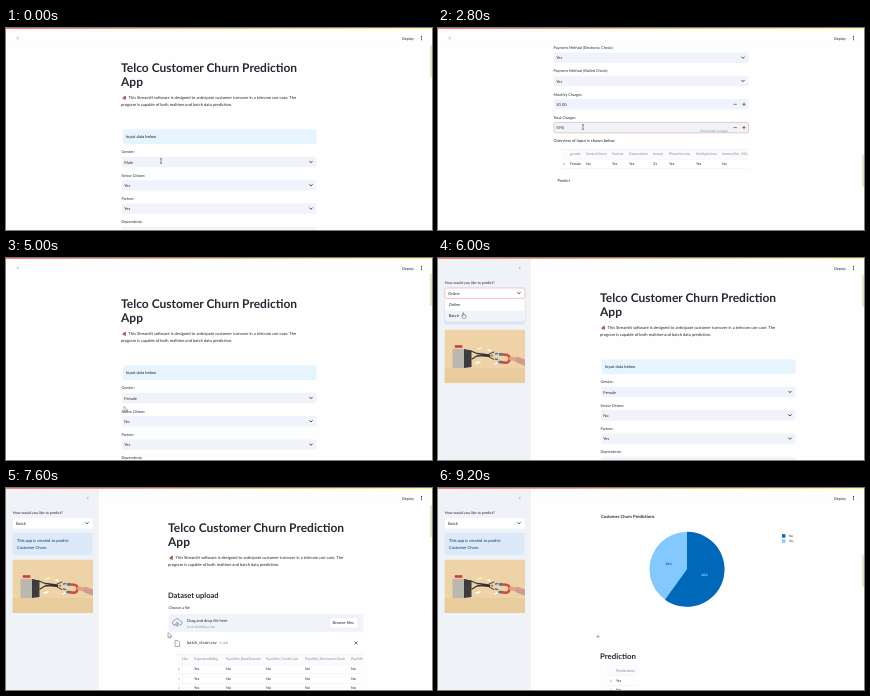
An HTML page that plays this animation: 426x202 px, repeating every 9.27 s.

```html
<!DOCTYPE html>
<html lang="en">
<head>
<meta charset="utf-8">
<title>Telco Customer Churn Prediction App</title>
<style>
  html, body { margin: 0; width: 100%; height: 100%; overflow: hidden; background: #fefefe; }
  svg { display: block; width: 100%; height: 100%; }
  text { font-family: Lato, "Open Sans", sans-serif; text-rendering: geometricPrecision; white-space: pre; }
</style>
</head>
<body>
<svg id="stage" viewBox="0 0 426 202">
  <defs>
    <linearGradient id="stripe">
      <stop offset="0" stop-color="#ff7a6b"/>
      <stop offset="1" stop-color="#fffd80"/>
    </linearGradient>
    <clipPath id="gridClip"><rect x="129" y="172" width="181" height="60"/></clipPath>
    <clipPath id="imageClip"><rect x="6.5" y="71.5" width="80.5" height="53.5"/></clipPath>
  </defs>
</svg>
<script>
const LOOP = 9270, STEP = 1000 / 15;
const INK = '#262833', MUTED = '#858a9a', FIELD = '#f0f4fa', INFO = '#e5f4fd', RED = '#e8908a';
const PITCH = 23.3, LEFT = 116, WIDTH = 194.5;
const stage = document.getElementById('stage');
const timed = [];

function add(parent, tag, attrs = {}) {
  const node = document.createElementNS('http://www.w3.org/2000/svg', tag);
  for (const key in attrs) node.setAttribute(key, attrs[key]);
  parent.append(node);
  return node;
}
const group = (parent, attrs) => add(parent, 'g', attrs);
const rect = (parent, x, y, width, height, fill, more) =>
  add(parent, 'rect', { x, y, width, height, fill, ...more });
const path = (parent, d, stroke, width = 0.7, fill = 'none') =>
  add(parent, 'path', { d, stroke, fill, 'stroke-width': width, 'stroke-linecap': 'round', 'stroke-linejoin': 'round' });

// y is the vertical middle of the capitals
function label(parent, x, y, string, size = 3.8, more = {}) {
  const node = add(parent, 'text', { x, y: y + size * 0.35, 'font-size': size, fill: INK, ...more });
  node.textContent = string;
  return node;
}
const bold = { 'font-weight': 700 };

function show(node, from, to = Infinity) {
  timed.push(t => node.setAttribute('visibility', t >= from && t < to ? 'visible' : 'hidden'));
  return node;
}
function valueText(parent, x, y, states) {
  const node = label(parent, x, y, '', 4);
  timed.push(t => { node.textContent = states.filter(s => s[0] <= t).pop()[1]; });
}
function track(keys, t, index = 1) {
  const next = keys.findIndex(k => k[0] > t);
  if (next < 0) return keys[keys.length - 1][index];
  const a = keys[next - 1], b = keys[next], u = (t - a[0]) / (b[0] - a[0]);
  return a[index] + (b[index] - a[index]) * u * u * (3 - 2 * u);
}

const chevron = (parent, x, y) => path(parent, `M${x - 1.3} ${y - 0.7}l1.3 1.4 1.3-1.4`, INK, 0.8);

function outline(parent, x, y, width, from, to) {
  show(rect(parent, x, y - 5.2, width, 10.4, 'none', { rx: 1.5, stroke: RED, 'stroke-width': 0.5 }), from, to);
}
function menu(parent, x, y, width, options, hover, from, to) {
  outline(parent, x, y, width, from, to);
  const list = show(group(parent), from, to);
  rect(list, x - 0.5, y + 6.2, width + 1, 23, '#d3d7e0', { rx: 2 });
  rect(list, x, y + 5.8, width, 22.4, '#fff', { rx: 2 });
  options.forEach((name, i) => {
    if (i === hover) rect(list, x, y + 6.4 + 11 * i, width, 10.3, FIELD);
    label(list, x + 4, y + 11.3 + 11 * i, name, 4);
  });
}

const page = group(stage);
const online = show(group(page), 0, 6130);
const batch = show(group(page), 6130);

// Shared heading
label(page, 115, 45.6, 'Telco Customer Churn Prediction', 12, bold);
label(page, 115, 60.2, 'App', 12, bold);
path(page, 'M117.2 75.6l2.2-1.5v3.2l-2.2-.7z', '#9a6a5c', 1, '#9a6a5c');
label(page, 122.5, 75.7, 'This Streamlit software is designed to anticipate customer turnover in a telecom use case. The', 4.1);
label(page, 115, 82.7, 'program is capable of both realtime and batch data prediction.', 4.1);

// Online form
rect(online, LEFT + 0.8, 107.5, WIDTH - 0.8, 14.5, INFO, { rx: 2 });
label(online, 120, 114.7, 'Input data below', 4.1);

const fieldY = i => 140 + PITCH * i;
function field(i, name, states = [[0, 'Yes']], numeric = false) {
  const y = fieldY(i);
  label(online, 115.5, y - 10, name, 3.75);
  rect(online, LEFT, y - 5.2, WIDTH, 10.4, FIELD, { rx: 1.5 });
  valueText(online, 118.3, y + 0.3, states);
  if (numeric) path(online, `M296 ${y}h2.4M304.8 ${y}h2.4M306 ${y - 1.2}v2.4`, INK, 0.6);
  else chevron(online, 305, y);
}
field(0, 'Gender:', [[0, 'Male'], [330, 'Female']]);
field(1, 'Senior Citizen:', [[0, 'Yes'], [600, 'No']]);
['Partner:', 'Dependents:'].forEach((name, i) => field(2 + i, name));
field(4, 'Tenure:', [[0, '0'], [800, '3'], [860, '31']], true);
['Phone Service:', 'Multiple Lines:'].forEach((name, i) => field(5 + i, name));
field(7, 'Internet Service (DSL):', [[0, 'Yes'], [1260, 'No']]);
['Internet Service (Fiber Optic):', 'No Internet Service:', 'Online Security:', 'Online Backup:',
 'Device Protection:', 'Tech Support:', 'Streaming TV:', 'Streaming Movies:', 'Contract:',
 'Paperless Billing:', 'Payment Method (Credit Card):', 'Payment Method (Electronic Check):',
 'Payment Method (Mailed Check):'].forEach((name, i) => field(8 + i, name));
field(21, 'Monthly Charges', [[0, '0.00'], [2260, '50'], [2400, '50.00']], true);
field(22, 'Total Charges', [[0, '0.00'], [2600, '5|'], [2665, '59|'], [2730, '595|'], [2930, '595.00']], true);
outline(online, LEFT, fieldY(4), WIDTH, 760, 930);
outline(online, LEFT, fieldY(21), WIDTH, 2200, 2400);
outline(online, LEFT, fieldY(22), WIDTH, 2530, 2930);
show(label(online, 262, 656, 'Press Enter to apply', 3.2, { fill: MUTED }), 2600, 2930);

// Column: x, heading, value
const overview = [
  [132, 'gender', 'Female'], [148, 'SeniorCitizen', 'No'], [174, 'Partner', 'Yes'],
  [191, 'Dependents', 'Yes'], [215, 'tenure', '31'], [231, 'PhoneService', 'Yes'],
  [258, 'MultipleLines', 'Yes'], [284, 'InternetSer_DSL', 'No']
];
function column(parent, [x, heading, value], y, rows = 1) {
  label(parent, x, y, heading, 3.55, { fill: MUTED });
  for (let r = 0; r < rows; r++) label(parent, x, y + 10 + 9.6 * r, value, 3.6);
}
function gridLines(parent, x, y, width, rows) {
  rect(parent, x, y - 4.5, width, 9, '#fafbfd');
  for (let r = 0; r <= rows + 1; r++) rect(parent, x, y - 4.8 + 9.7 * r, width, 0.35, '#e3e6ec');
}
function indexColumn(parent, x, y, rows) {
  for (let r = 0; r < rows; r++) label(parent, x, y + 10 + 9.6 * r, r, 3.2, { fill: MUTED });
}
label(online, 115.5, 666, 'Overview of Input is shown below', 4.1);
gridLines(online, 123.5, 679, 187, 1);
indexColumn(online, 125, 679, 1);
overview.forEach(c => column(online, c, 679));
label(online, 119.5, 706, 'Predict', 4);

menu(online, LEFT, fieldY(0), WIDTH, ['Male', 'Female'], 1, 130, 330);
menu(online, LEFT, fieldY(1), WIDTH, ['Yes', 'No'], 1, 400, 600);
menu(online, LEFT, fieldY(7), WIDTH, ['Yes', 'No'], 0, 1060, 1260);

// Batch upload
label(batch, 115, 113.4, 'Dataset upload', 7.5, bold);
label(batch, 115.5, 126, 'Choose a file', 3.75);
rect(batch, 115.5, 132, 195, 18, FIELD, { rx: 2 });
path(batch, 'M121.8 143h5a2.1 2.1 0 0 0 .2-4.2 2.9 2.9 0 0 0-5.5-.2 2.2 2.2 0 0 0 .3 4.4zM124.2 144.5v-4.2m-1.4 1.3 1.4-1.4 1.4 1.4', '#858b9c', 0.8);
label(batch, 134, 138.8, 'Drag and drop file here', 4);
label(batch, 134, 145, 'Limit 200MB per file', 3.1, { fill: MUTED });
rect(batch, 276.5, 135.8, 28.5, 10.4, '#fff', { rx: 1.5, stroke: '#d8dbe3', 'stroke-width': 0.4 });
label(batch, 279.5, 141, 'Browse files', 4);

const uploaded = show(group(batch), 6930);
path(uploaded, 'M122.5 158.5h2.6l1.5 1.5v4.5h-4.1z', '#858b9c', 0.7);
label(uploaded, 134, 161, 'batch_churn.csv', 4.2);
label(uploaded, 166.5, 161, '0.5KB', 3.1, { fill: MUTED });
path(uploaded, 'M301.8 159.8l2.4 2.4m0-2.4-2.4 2.4', INK, 0.6);
gridLines(uploaded, 123.5, 177, 187, 5);
indexColumn(uploaded, 125, 177, 5);
rect(uploaded, 129, 172, 0.35, 58, '#e3e6ec');
const cells = group(group(uploaded, { 'clip-path': 'url(#gridClip)' }));
overview.slice(0, 7).forEach(([x, heading, value]) => column(cells, [x - 166, heading, value], 177, 5));
[[118, 'InternetSer', 'No'], [141, 'PaperlessBilling', 'Yes'], [173, 'PaytMtd_BankTransfer', 'No'],
 [213, 'PaytMtd_CreditCard', 'No'], [252, 'PaytMtd_ElectronicCheck', 'No'],
 [298, 'PaytMtd_MailedCheck', 'No']].forEach(c => column(cells, c, 177, 5));
label(uploaded, 119.5, 246, 'Predict', 4);

// Pie chart and predictions
const result = show(group(batch), 8400);
label(result, 116, 285, 'Customer Churn Predictions', 4.25, bold);
const pie = { x: 202, y: 337.3, r: 37.5 }, split = 0.6 * 2 * Math.PI;
const edge = `${pie.x + pie.r * Math.sin(split)} ${pie.y - pie.r * Math.cos(split)}`;
add(result, 'circle', { cx: pie.x, cy: pie.y, r: pie.r, fill: '#83c9ff' });
path(result, `M${pie.x} ${pie.y}v${-pie.r}A${pie.r} ${pie.r} 0 1 1 ${edge}z`, 'none', 0, '#0068b9');
label(result, 216.5, 343, '60%', 3.2, { fill: '#fff' });
label(result, 180.5, 331.5, '40%', 3.2);
[['#0068b9', 'No'], ['#83c9ff', 'Yes']].forEach(([color, name], i) => {
  rect(result, 297, 302.2 + 5.2 * i, 3.4, 3.4, color);
  label(result, 304, 304 + 5.2 * i, name, 3.1);
});
label(result, 115, 424.7, 'Prediction', 7.8, bold);
gridLines(result, 122, 438.5, 31, 2);
indexColumn(result, 125, 438.5, 2);
label(result, 131, 438.5, 'Predictions', 3.8, { fill: MUTED });
['Yes', 'No'].forEach((v, i) => label(result, 131, 448.5 + 9.6 * i, v, 3.6));

// Header
rect(stage, 0, 0, 426, 12.5, '#fefefe');
path(stage, 'M11.3 9l1 1.1-1 1.1', '#777b88', 0.6);
label(stage, 396, 10.2, 'Deploy', 3.8);
[8.4, 10.1, 11.8].forEach(cy => add(stage, 'circle', { cx: 415.5, cy, r: 0.55, fill: INK }));
const thumb = rect(stage, 424.3, 16, 1.4, 32, '#dedcb4');

// Sidebar
const sidebar = group(stage);
rect(sidebar, 0, 0, 93, 202, '#eff3f7');
path(sidebar, 'M82.2 9l-1 1.1 1 1.1', '#e0776c', 0.6);
label(sidebar, 6.8, 25.2, 'How would you like to predict?', 3.7);
rect(sidebar, 6.8, 30, 80, 10.4, '#fff', { rx: 1.5 });
valueText(sidebar, 10, 35.3, [[0, 'Online'], [6130, 'Batch']]);
chevron(sidebar, 81, 35.2);
rect(sidebar, 6.8, 45, 80, 22, '#dbe9f8', { rx: 2 });
label(sidebar, 11, 52.6, 'This app is created to predict', 4.1, { fill: '#004280' });
label(sidebar, 11, 59.6, 'Customer Churn', 4.1, { fill: '#004280' });

const art = group(sidebar, { 'clip-path': 'url(#imageClip)' });
rect(art, 6.5, 71.5, 80.5, 53.5, '#edd3a6');
rect(art, 6.5, 110, 80.5, 15, '#e8cc9c');
rect(art, 14.5, 91, 12, 19, '#b9b7b0');
path(art, 'M26 91l7.5 1.5V109l-7.5 1z', 'none', 0, '#3c3b3d');
rect(art, 16.8, 87.2, 7.5, 2.6, '#cf4038');
path(art, 'M33 93l6 2.5 5 .5M34 101l5-3 6-.5', '#34363d', 1.3);
path(art, 'M45 97l6 .6', '#2f3339', 2.8);
path(art, 'M51 96l5-2M51 99l5 2.5', '#3d4047', 1);
add(art, 'circle', { cx: 54, cy: 97.7, r: 1.3, fill: '#c88762' });
path(art, 'M40 91l3-1M38 105l4-1M57 106l2-1M50 92l2 .5', '#fff', 1.3);
path(art, 'M57.5 96l2-.5M57.5 101l2 .5', '#4a78a8', 1.4);
path(art, 'M64 96.5l4 .2a4 4 0 0 1-.6 8l-4-.6', '#cf4a3f', 2.6);
path(art, 'M62 96.4h1.2M61.5 104l1.2.1', '#4a78a8', 2.6);
path(art, 'M73 100.5l6 1', '#dfa78a', 4);
path(art, 'M80 102l8 3', '#d39a90', 6);
menu(sidebar, 6.8, 35.2, 80, ['Online', 'Batch'], 1, 5800, 6130);
rect(stage, 0, 0, 426, 1, 'url(#stripe)');

// Pointer shapes, with the hot spot at the origin
const pointer = group(stage);
const shapes = {
  arrow: path(pointer, 'M0 0v4.6l1.1-1 .8 1.8.9-.4-.8-1.7h1.5z', '#333', 0.4, '#fff'),
  beam: path(pointer, 'M-.7-2.2h1.4M0-2.2v4.4M-.7 2.2h1.4', '#333', 0.5),
  hand: path(pointer, 'M0 0v2.7l-1-.6-.5.6 1.5 2.3h2.5l.6-2.9-2.2-.5V0q-.45-.6-.9 0z', '#333', 0.45, '#fff'),
  cross: path(pointer, 'M-1.2 0h2.4M0-1.2v2.4', '#666', 0.5)
};
const shapeTimes = [[0, 'beam'], [130, 'hand'], [660, 'beam'], [930, 'hand'], [1400, 'arrow'],
  [2130, 'beam'], [2930, 'arrow'], [3130, 'hand'], [3600, 'arrow'], [5250, 'hand'],
  [6200, 'arrow'], [6500, 'hand'], [7000, 'arrow'], [8200, 'hand'], [8500, 'cross']];
const pointerPath = [[0, 155, 133], [130, 155, 133], [270, 130, 155], [400, 130, 157], [530, 130, 179],
  [660, 130, 134], [930, 130, 134], [1060, 132, 78], [1130, 132, 92], [1200, 132, 98], [1400, 132, 100],
  [2130, 150, 76], [2400, 150, 76], [2530, 145, 99], [2930, 145, 99], [3200, 126, 153], [3700, 126, 153],
  [4800, 118, 149], [5000, 118, 149], [5260, 12, 10], [5500, 12, 10], [5750, 40, 35], [5930, 25, 55],
  [6130, 25, 56], [6500, 337, 135], [6930, 337, 135], [7250, 230, 180], [7530, 162, 145],
  [7800, 162, 145], [8200, 170, 157], [8400, 170, 157], [8800, 160, 148.5]];
const scrollPath = [[0, 6], [600, 6], [730, 100], [870, 100], [1060, 227.6], [1300, 227.6], [1650, 400],
  [1760, 400], [2130, 553], [3700, 553], [4700, 0], [5000, 0], [5250, 6], [7800, 6], [8130, 95],
  [8400, 95], [8860, 256]];
const sidebarPath = [[0, 0], [5330, 0], [5600, 1]];
const gridPath = [[0, 166], [7070, 166], [7530, 0]];

const move = (node, x, y = 0) => node.setAttribute('transform', `translate(${x} ${y})`);

function draw(now) {
  const t = Math.floor((now % LOOP + 5) / STEP) * STEP;
  const scroll = track(scrollPath, t), open = track(sidebarPath, t);
  timed.forEach(update => update(t));
  move(page, 47 * open, -scroll);
  move(sidebar, 93 * (open - 1));
  move(cells, track(gridPath, t));
  move(pointer, track(pointerPath, t), track(pointerPath, t, 2));
  thumb.setAttribute('y', 16 + 0.2 * scroll);
  const shape = shapeTimes.filter(s => s[0] <= t).pop()[1];
  for (const name in shapes) shapes[name].setAttribute('visibility', name === shape ? 'visible' : 'hidden');
}

let start;
function tick(now) {
  start ??= now;
  draw(now - start);
  requestAnimationFrame(tick);
}
draw(0);
requestAnimationFrame(tick);
</script>
</body>
</html>
```
